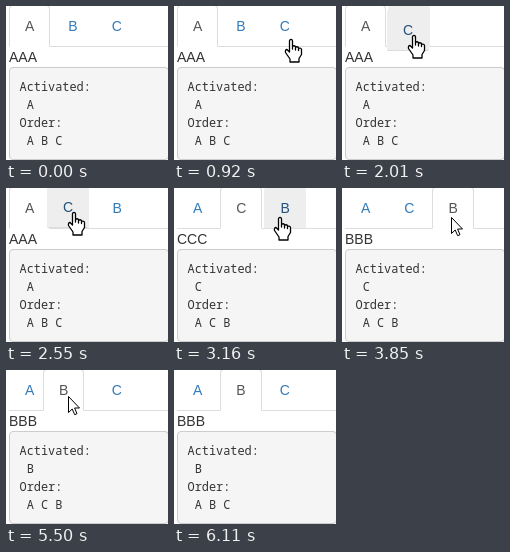
Recreate the animation shown at these times as an HTML page. Size 162x154 px, loop 6640 ms.

```html
<!DOCTYPE html>
<html lang="en">
<head>
<meta charset="utf-8">
<title>Sortable tabs</title>
<style>
  html, body { margin: 0; width: 100%; height: 100%; overflow: hidden; background: #fff; }
  body { position: relative; font: 14px/20px "Liberation Sans", Arial, sans-serif; color: #333; }
  #line { position: absolute; left: 3px; right: 0; top: 40px; height: 1px; background: #ddd; }
  .tab {
    position: absolute; top: -1px; padding: 10px 15px; white-space: nowrap;
    border: 1px solid transparent; border-radius: 4px 4px 0 0; color: #337ab7;
  }
  .tab.hover { background: #eee; border-color: #eee #eee #ddd; color: #23527c; }
  .tab.active { background: #fff; border-color: #ddd #ddd transparent; color: #555; }
  .tab.drag { z-index: 1; }
  #pane { position: absolute; left: 3px; top: 41px; }
  pre {
    position: absolute; left: 3px; top: 61px; width: 160px; height: 93px; margin: 0;
    box-sizing: border-box; padding: 8.5px 9.5px; background: #f5f5f5;
    border: 1px solid #ccc; border-radius: 4px;
    font: 11.9px/18px "Noto Sans Mono", "DejaVu Sans Mono", monospace;
  }
  svg { position: absolute; left: 0; top: 0; width: 1px; height: 1px; overflow: visible; z-index: 2; }
  path { fill: #fff; stroke: #000; stroke-linejoin: round; }
</style>
</head>
<body>
<div id="line"></div>
<div class="tab">A</div>
<div class="tab">B</div>
<div class="tab">C</div>
<div id="pane"></div>
<pre></pre>
<svg>
  <path id="arrow" d="M.5 .5V16.5L4.2 13 6.7 18.7 9 17.7 6.6 12H11.5Z"/>
  <path id="hand" stroke-width="1.3" d="M-1.5 13V2Q-1.5 .5 0 .5T1.5 2V10V7.5Q3 6 4.5 7.5V11V8.5Q6 7 7.5 8.5V11.5V9.5Q10 8.5 10.5 10.5V15.5L8 19.5V23H-1V20L-5.5 13.5Q-6 10.5 -4 10.5Z"/>
</svg>
<script>
const LOOP = 6640, STEP = 77;
const DRAG_C = 1380, DROP_C = 2780, CLICK_B = 3850, DRAG_B = 4650, DROP_B = 5810;
const ENTER = 540, LEAVE = 6110;

const find = s => document.querySelector(s);
const tabs = {};
document.querySelectorAll('.tab').forEach(el => tabs[el.textContent] = el);
const pane = find('#pane'), log = find('pre'), svg = find('svg');
const arrow = find('#arrow'), hand = find('#hand');

// Pointer glides; pow sets how strongly each one slows down
const glides = [
  { from: ENTER, to: 1150, x: 117, y: 25, pow: 2.5 },
  { from: DRAG_C - STEP, to: 2010, x: 71, y: 29, pow: 1 },
  { from: 2013, to: 2390, x: 68, y: 24, pow: 2 },
  { from: DROP_C, to: 3320, x: 109, y: 29, pow: 2 },
  { from: 4023, to: 4250, x: 115, y: 26, pow: 2 },
  { from: DRAG_B - STEP, to: 5270, x: 62, y: 26, pow: 2 },
  { from: DROP_B - STEP, to: LEAVE, x: 10, y: 140, pow: 1 }
];

const during = (t, from, to) => t >= from && t < to;
const activeAt = t => t < DROP_C ? 'A' : t < CLICK_B ? 'C' : 'B';

function pointer(t) {
  let x = 111, y = 119;
  for (const g of glides) {
    if (t < g.from) break;
    const time = Math.floor((t - g.from) / STEP + .1) * STEP;
    const ease = 1 - (1 - Math.min(1, time / (g.to - g.from))) ** g.pow;
    x += (g.x - x) * ease;
    y += (g.y - y) * ease;
  }
  return { x: Math.round(x), y: Math.round(y) };
}

function render(t) {
  const p = pointer(t), seen = pointer(t - STEP);
  const active = activeAt(t);
  const drag = during(t, DRAG_C, DROP_C) ? 'C' : during(t, DRAG_B, DROP_B) ? 'B' : '';
  const slots = during(t, 2240, 5040) ? 'ACB' : 'ABC';
  const saved = during(t, DROP_C + STEP, DROP_B + STEP) ? 'A C B' : 'A B C';
  let left = 3, pointing = false;

  for (const name of slots) {
    const el = tabs[name], held = name === drag, right = left + el.offsetWidth;
    const under = q => held || q.y < 41 && q.x > left && q.x < right;
    const link = name !== active;
    el.classList.toggle('active', !link);
    el.classList.toggle('drag', held);
    el.classList.toggle('hover', link && under(seen)); // highlight lags one step
    pointing ||= link && under(p);

    const grab = name === 'C' ? 27 : 25;
    el.style.left = (held ? p.x - grab : left) + 'px';
    el.style.top = (held ? p.y - (name === 'C' ? 26 : 27) : -1) + 'px';
    left += el.getBoundingClientRect().width + 2;
  }

  pane.textContent = active.repeat(3);
  log.textContent = `Activated:\n ${activeAt(t - STEP)}\nOrder:\n ${saved}`;

  svg.style.display = during(t, ENTER, LEAVE) ? '' : 'none';
  svg.style.transform = `translate(${p.x}px, ${p.y}px)`;
  hand.style.display = pointing ? '' : 'none';
  arrow.style.display = pointing ? 'none' : '';
}

const start = performance.now();
function tick() {
  render((performance.now() - start) % LOOP);
  requestAnimationFrame(tick);
}
tick();
</script>
</body>
</html>
```
